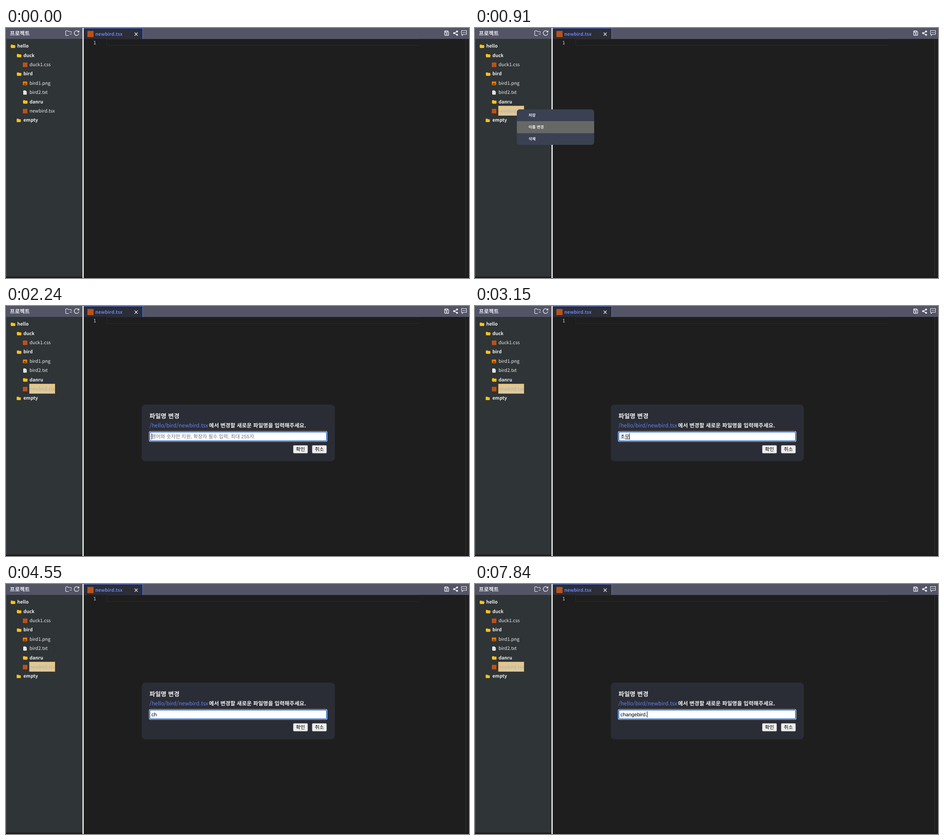
These frames come from a looping animation (1018 by 550 pixels, 8 s). An HTML page:

```html
<!DOCTYPE html>
<html lang="ko">
<head>
<meta charset="utf-8">
<style>
html, body { margin: 0; width: 100%; height: 100%; overflow: hidden; background: #1e1e1e; }
svg { display: block; width: 1018px; height: 550px; }
text { font: 10.18px "Noto Sans CJK KR", "Noto Sans CJK", sans-serif; fill: #eee; text-rendering: geometricPrecision; white-space: pre; }
.bold { font-weight: 700; }
.blue { fill: #6283ef; }
.head { font-size: 11.87px; }
.title { font-size: 13.5px; }
.small { font-size: 8.48px; }
.button { font-size: 10.9px; fill: #000; }
.line { font: 10.2px "DejaVu Sans Mono", monospace; fill: #d0d0d0; }
#typed { font: 11.2px "Liberation Sans", Arial, "Noto Sans CJK KR", sans-serif; fill: #000; }
#hint { font: 10.9px "Liberation Sans", Arial, "Noto Sans CJK KR", sans-serif; fill: #757575; }
.icon { fill: none; stroke: #f2f2f2; stroke-width: 1.1; }
</style>
</head>
<body>
<svg viewBox="0 0 1018 550">
  <defs>
    <path id="folder" d="M0 1.2q0-1 1-1h2.8l1.2 1.3h3q1 0 1 1v4.2q0 1-1 1H1q-1 0-1-1z" fill="#fcc21b"/>
    <g id="open">
      <path d="M.6 1.3q0-1 1-1h2.4l1.2 1h4q1 0 1 1V6.900q0 1-1 1H1L0 3h.6z" fill="#fcc21b"/>
      <path d="M10.800 4.500h2" stroke="#7d8284" stroke-width=".8"/>
    </g>
    <rect id="mark" width="10" height="10" fill="#b9521b"/>
    <g id="image">
      <rect width="9.500" height="8" rx="1" fill="#f57c00"/>
      <path d="M1.300 6.500l2.200-3 1.600 1.700 1.200-1.200 2 2.500z" fill="#3a2410"/>
    </g>
    <g id="doc">
      <path d="M0 .8q0-.8.8-.8h4.200l2.500 2.500v5.700q0 .8-.8.8H.8q-.8 0-.8-.8z" fill="#fff"/>
      <path d="M2 5l1.400 1.500 2.400-2.700" fill="none" stroke="#555b5e" stroke-width=".9"/>
    </g>
  </defs>

  <rect width="1018" height="550" fill="#1e1e1e"/>
  <rect width="168" height="550" fill="#2f3436"/>
  <rect width="1018" height="24" fill="#535567"/>
  <path d="M.5 0v547" stroke="#494d55"/>
  <rect y="547" width="1018" height="3" fill="#1c181c"/>
  <rect x="168" width="3" height="550" fill="#dcdcdc"/>
  <rect x="171" width="130" height="24" fill="#2b2d37"/>
  <path d="M171 .5h130M300.500 0v24" stroke="#5377e8"/>
  <rect x="221.500" y="24.500" width="687" height="14" fill="none" stroke="#292929"/>
  <rect x="908" y="24" width="2" height="16" fill="#1e1e1e"/>
  <path d="M1010.500 24v523" stroke="#343434"/>

  <text class="bold head" x="8.500" y="15.800">프로젝트</text>
  <rect x="179" y="6.500" width="13.500" height="13.500" fill="#b9521b"/>
  <text class="bold blue" x="196.300" y="16.900">newbird.tsx</text>
  <path class="icon" d="M282.800 10l6.700 7m0-7l-6.700 7" stroke-width="1.200"/>
  <text class="line" x="192" y="35.500">1</text>

  <g class="icon">
    <path d="M138 16.500h-5.700q-1 0-1-1V7q0-1 1-1h3.200l1.700 1.800h5.300q1 0 1 1v2M140 13.500h4.500"/>
    <path d="M159.600 8.200A5.200 5.200 0 1 0 160.400 12M160.400 5.500v3.400h-3.400" stroke-width="1.300"/>
    <path d="M964.500 7.200q0-.8.800-.8h5.700l2.300 2.300v6.500q0 .8-.8.800h-7.200q-.8 0-.8-.8zM966.300 6.500v3h4.200v-3" stroke-width="1.300"/>
    <circle cx="969" cy="12.800" r="1" stroke-width="1.300"/>
    <path d="M991.800 7.800L985 11.300l6.800 3.600" stroke-width="1.400"/>
    <path d="M1001.500 5.500h11v8.500h-7l-2.500 2.500V14h-1.500z"/>
    <path d="M1004 9.800h1.500m1 0h1.500m1 0h1.500" stroke-width="1.400"/>
  </g>
  <g fill="#f2f2f2"><circle cx="991.800" cy="7.700" r="2.100"/><circle cx="985.200" cy="11.300" r="2.100"/><circle cx="991.800" cy="15" r="2.100"/></g>

  <g id="tree"></g>

  <g id="selected">
    <rect x="51.500" y="171.500" width="56" height="21" fill="#dec898" stroke="#e0a13c"/>
    <text x="51.700" y="185.900" style="fill:#b3b0a9">newbird.tsx</text>
  </g>

  <g id="menu">
    <rect x="92" y="179" width="170" height="78" rx="6" fill="#3a4152"/>
    <path id="hover" fill="#666866"/>
    <text class="bold small" x="117.700" y="195">저장</text>
    <text class="bold small" x="117.700" y="221.200">이름 변경</text>
    <text class="bold small" x="117.700" y="247.400">삭제</text>
  </g>

  <g id="dialog">
    <rect x="298.500" y="217" width="424.500" height="124.500" rx="8" fill="#2b2d36"/>
    <text class="bold title" x="315.500" y="246.500">파일명 변경</text>
    <text class="head" x="315.500" y="267.300"><tspan class="blue">/hello/bird/newbird.tsx</tspan></text>
    <text class="bold head" x="446.300" y="267.300">에서 변경할 새로운 파일명을 입력해주세요.</text>
    <rect x="314.500" y="275.500" width="392" height="23" rx="3" fill="#fff"/>
    <rect x="316.200" y="277.200" width="388.600" height="19.600" rx="1.500" fill="#fff" stroke="#1b5fc0" stroke-width="1.700"/>
    <text id="hint" x="319.700" y="291">영어와 숫자만 지원, 확장자 필수 입력, 최대 255자</text>
    <text id="typed" x="319.700" y="291"></text>
    <rect id="underline" y="292" height="1" fill="#000"/>
    <rect id="caret" y="280" width="1" height="14" fill="#000"/>
    <g fill="#efefef" stroke="#767676" stroke-width=".8">
      <rect x="631.500" y="306.500" width="32" height="17.500" rx="2"/>
      <rect x="673" y="306.500" width="32" height="17.500" rx="2"/>
    </g>
    <text class="button" x="637.500" y="319">확인</text>
    <text class="button" x="679" y="319">취소</text>
  </g>
</svg>
<script>
const $ = id => document.getElementById(id);

// label, depth, icon, icon height
const rows = [
  ['hello', 0, 'open', 8], ['duck', 1, 'open', 8], ['duck1.css', 2, 'mark', 10],
  ['bird', 1, 'open', 8], ['bird1.png', 2, 'image', 8], ['bird2.txt', 2, 'doc', 9],
  ['danru', 2, 'open', 8], ['newbird.tsx', 2, 'mark', 10], ['empty', 1, 'folder', 8]
];
$('tree').innerHTML = rows.map(([label, depth, icon, height], i) => {
  const x = 10 + depth * 13.5, y = 39.8 + i * 20.38;
  const bold = /open|folder/.test(icon) ? 'bold' : '';
  const shift = icon === 'doc' ? 1 : 0;
  return `<use href="#${icon}" x="${x + shift}" y="${y + 0.4 - height / 2}"/>
    <text class="${bold}" x="${x + 14.7}" y="${y + 3.5}">${label}</text>`;
}).join('');

// start time, input text, caret shown, last syllable being composed
const typing = [
  [1190, '', 1], [1750, '', 0], [2240, '', 1],
  [2800, 'ㅊ', 1, 1], [2940, '초', 1, 1], [3080, '초ㅁ', 1, 1], [3150, '초무', 1, 1],
  [3360, '초뭏', 1, 1], [3500, '초', 1], [3640, '', 1],
  [3920, 'c', 1], [4060, 'ch', 1], [4550, 'ch', 0],
  [4620, 'cha', 1], [4690, 'chan', 1], [4760, 'chang', 1], [4970, 'change', 1],
  [5460, 'change', 0], [6020, 'change', 1],
  [6300, 'changeb', 1], [6440, 'changebi', 1], [6510, 'changebir', 1],
  [7070, 'changebi', 1], [7140, 'changebir', 1], [7350, 'changebird', 1], [7840, 'changebird.', 1]
];

const show = (id, on) => $(id).style.display = on ? '' : 'none';

function drawInput(t) {
  const [, text, caret, composing] = typing.findLast(([start]) => t >= start);
  const typed = $('typed');
  typed.textContent = text;
  typed.style.fontSize = /[^\x00-\x7f]/.test(text) ? '10.6px' : '11.2px';
  const width = text ? typed.getComputedTextLength() : 0;
  const glyph = composing ? width / text.length : 0;
  show('hint', !text);
  show('caret', caret);
  $('caret').setAttribute('x', Math.round(319.7 + width));
  $('underline').setAttribute('x', 319.7 + width - glyph);
  $('underline').setAttribute('width', glyph);
}

function frame(now) {
  const t = now % 8000;
  show('selected', t >= 140);
  show('menu', t >= 420 && t < 1190);
  show('dialog', t >= 1190);
  $('hover').setAttribute('d', t < 630 ? '' : t < 910
    ? 'M92 205v-20q0-6 6-6h158q6 0 6 6v20z'
    : 'M92 205h170v26.500h-170z');
  if (t >= 1190) drawInput(t);
  requestAnimationFrame(frame);
}
requestAnimationFrame(frame);
</script>
</body>
</html>
```
